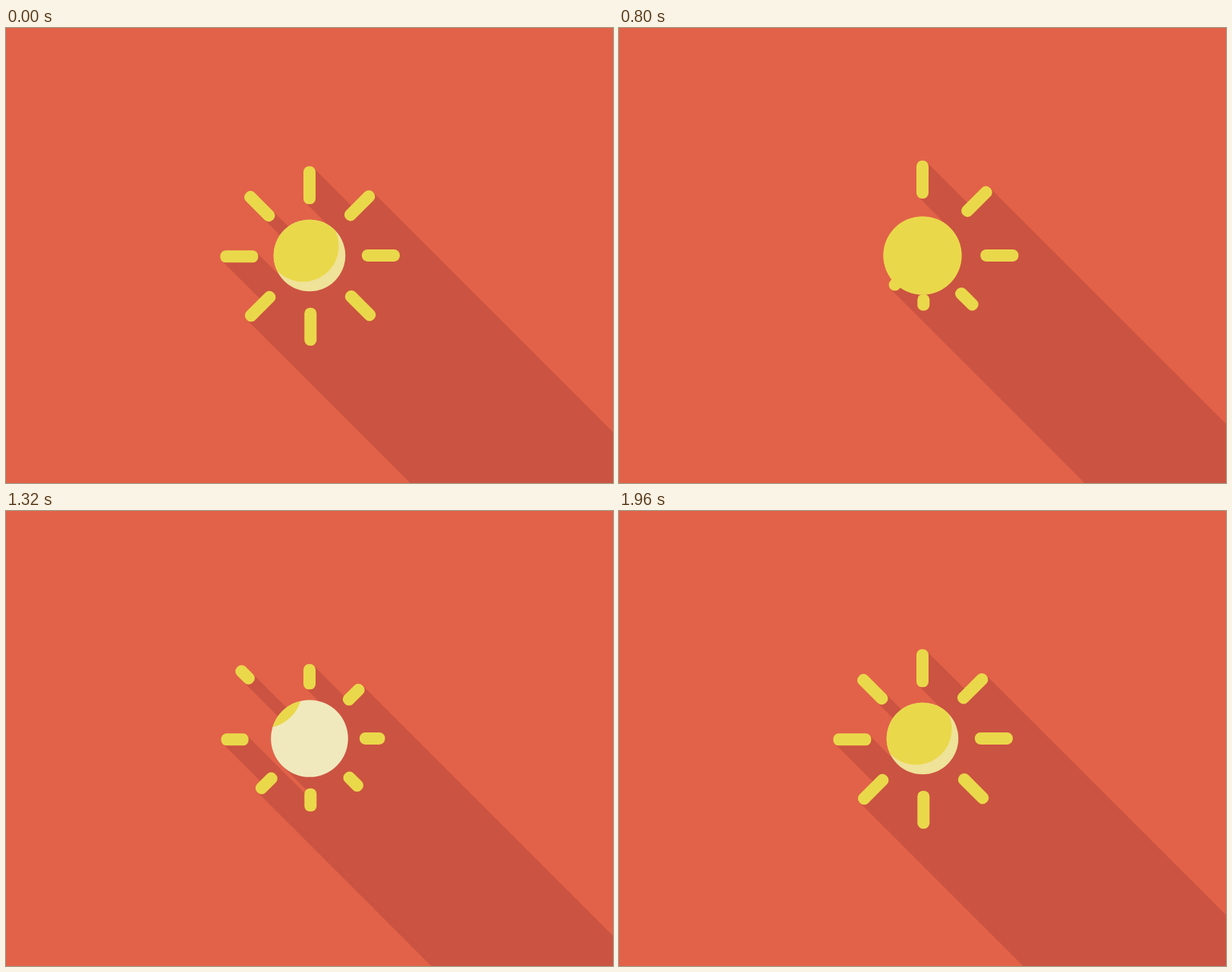
Write an HTML page with a canvas that moves like this. It is 800 px wide and 600 px high and loops after 3240 ms.

```html
<!DOCTYPE html>
<html lang="en">
<head>
<meta charset="utf-8">
<title>Sun</title>
<style>
  html, body { margin: 0; width: 100%; height: 100%; overflow: hidden; background: #e16248; }
  canvas { display: block; width: 100%; height: 100%; }
</style>
</head>
<body>
<canvas id="stage" width="800" height="600"></canvas>
<script>
const ctx = document.getElementById('stage').getContext('2d');
const LOOP = 3240, STEP = 40, START = 680, END = 1960;
const BG = '#e16248', SHADE = '#cb5341', YELLOW = '#ead84b';
const CX = 400, CY = 300, HALF = 8;
const TWIST = 0.65; // small sideways shift of every ray

// Turning points [time, value] of the springy moves
const INNER = [[0, 53], [160, 89], [280, 114], [490, 73], [620, 73], [760, 80], [920, 76.3]];
const OUTER = [[0, 53], [160, 129], [220, 129.5], [590, 87], [790, 113], [920, 110.3]];
const SUN = [[0, 6], [140, 54], [350, 39], [610, 51], [840, 47.3]];

// Sine ease in and out from one turning point to the next
function swing(keys, t) {
  const i = keys.findIndex(k => k[0] > t);
  if (i < 0) return keys[keys.length - 1][1];
  if (i === 0) return keys[0][1];
  const [t0, v0] = keys[i - 1], [t1, v1] = keys[i];
  return v0 + (v1 - v0) * (1 - Math.cos(Math.PI * (t - t0) / (t1 - t0))) / 2;
}

// Rays run clockwise from the top; the first three start together, the last two lag
function makeRay(i, t) {
  const delay = STEP * (Math.max(0, i - 2) + 2 * Math.max(0, i - 5));
  const age = t - START - delay;
  if (age < 0) return null;
  const a = (i - 2) * Math.PI / 4, c = Math.cos(a), s = Math.sin(a);
  const x = CX + TWIST, y = CY + TWIST;
  const inner = swing(INNER, age), outer = swing(OUTER, age);
  const at = d => [x + d * c + TWIST * s, y + d * s - TWIST * c];
  return { x, y, a, inner, outer, r: HALF, pts: [at(inner), at(outer)] };
}

// Band swept by a round-ended shape towards the lower right
function addShadow(path, { pts, r }) {
  const side = p => p[0] - p[1], k = r * Math.SQRT1_2, far = 900;
  const sorted = [...pts].sort((p, q) => side(p) - side(q));
  const [lx, ly] = sorted[0], [hx, hy] = sorted[sorted.length - 1];
  path.moveTo(hx + k, hy - k);
  path.lineTo(hx + k + far, hy - k + far);
  path.lineTo(lx - k + far, ly + k + far);
  path.lineTo(lx - k, ly + k);
  path.closePath();
}

function drawRay({ x, y, a, inner, outer }) {
  const len = outer - inner;
  ctx.save();
  ctx.translate(x, y);
  ctx.rotate(a);
  ctx.beginPath();
  ctx.roundRect(inner - HALF, -HALF - TWIST, len + 2 * HALF, 2 * HALF, len < 1 ? HALF : 7.4);
  ctx.fill();
  ctx.restore();
}

function disc(x, y, r) {
  ctx.beginPath();
  ctx.arc(x, y, r, 0, Math.PI * 2);
}

function paleColor(t) {
  const u = Math.max(0, Math.min(1, (t - 1320) / 480));
  const mix = (a, b) => Math.round(a + (b - a) * u);
  return `rgb(${mix(240, 239)},${mix(233, 226)},${mix(189, 153)})`;
}

// The yellow disc slips off to the lower right, then settles back from the upper left
function drawSun(t, r) {
  const back = t >= 1200;
  const d = back
    ? -8 - 52.4 * Math.exp((1320 - t) / 148)
    : 34 * (Math.max(0, t - 800) / 200) ** 2;
  ctx.save();
  disc(CX, CY, r);
  ctx.fillStyle = d === 0 ? YELLOW : paleColor(t);
  ctx.fill();
  ctx.clip();
  ctx.fillStyle = YELLOW;
  disc(CX + d, CY + d - (back ? 4 : 0), r);
  ctx.fill();
  ctx.restore();
}

function draw(t) {
  ctx.fillStyle = BG;
  ctx.fillRect(0, 0, 800, 600);
  if (t >= STEP && t < START) return;
  if (t < STEP || t > END) t = END;

  const r = swing(SUN, t - START);
  const rays = Array.from({ length: 8 }, (_, i) => makeRay(i, t)).filter(Boolean);
  const shadow = new Path2D();
  [...rays, { pts: [[CX, CY]], r }].forEach(shape => addShadow(shadow, shape));
  ctx.fillStyle = SHADE;
  ctx.fill(shadow);

  ctx.fillStyle = YELLOW;
  rays.forEach(drawRay);
  drawSun(t, r);
}

const origin = performance.now();
function tick() {
  const t = (performance.now() - origin) % LOOP;
  draw(Math.floor(t / STEP) * STEP);
  requestAnimationFrame(tick);
}
tick();
</script>
</body>
</html>
```
